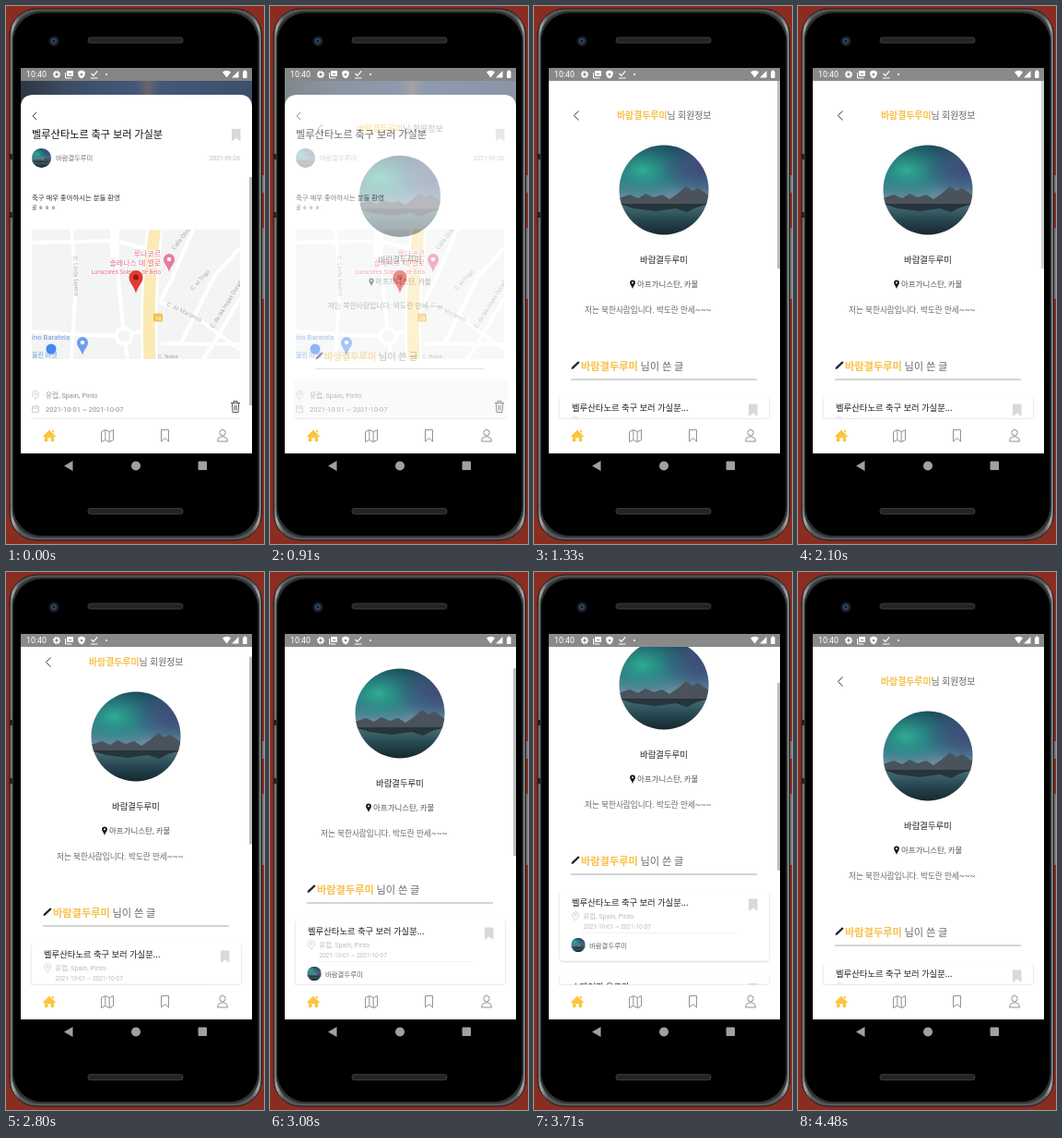
An HTML page for the animation above (4550 ms loop, 280 px wide and 582 px high).

```html
<!DOCTYPE html>
<html lang="ko">
<head>
<meta charset="utf-8">
<style>
html, body { margin: 0; width: 100%; height: 100%; overflow: hidden; background: #8a2d21; }
svg { display: block; width: 280px; height: 582px; font-family: Roboto, 'Noto Sans CJK KR', 'Noto Sans CJK', sans-serif; }
</style>
</head>
<body>
<svg id="stage" viewBox="0 0 280 582"></svg>
<script>
const LOOP = 4550, STEP = 70;
const USER = '바람결두루미', TRIP = '벨루산타노르 축구 보러 가실분';
const YELLOW = '#f7c04a';

const text = (x, y, size, str, fill, extra = '') =>
  `<text x="${x}" y="${y}" font-size="${size}" fill="${fill}" ${extra}>${str}</text>`;
const rect = (x, y, w, h, fill, extra = '') =>
  `<rect x="${x}" y="${y}" width="${w}" height="${h}" fill="${fill}" ${extra}/>`;
const circle = (x, y, r, fill, extra = '') =>
  `<circle cx="${x}" cy="${y}" r="${r}" fill="${fill}" ${extra}/>`;
const line = (d, stroke, width = 1, extra = '') =>
  `<path d="${d}" fill="none" stroke="${stroke}" stroke-width="${width}" ${extra}/>`;
const shape = (d, fill) => `<path d="${d}" fill="${fill}"/>`;
const avatar = (x, y, r) => `<use href="#lake" transform="translate(${x} ${y}) scale(${r / 48.5})"/>`;
const chevron = (x, y, size) => line(`M${x + size / 2} ${y - size}l${-size} ${size} ${size} ${size}`, '#444', 1);
const bookmark = (x, y) => shape(`M${x} ${y}h9.5v13.5l-4.75-3.6-4.75 3.6z`, '#d9d9d9');
const placeIcon = (x, y, color) =>
  line(`M${x} ${y + 4.5}c-2-2.5-3.5-4-3.5-5.8a3.5 3.5 0 0 1 7 0c0 1.8-1.5 3.3-3.5 5.8z`, color, .8) +
  circle(x, y - 1.3, 1.2, 'none', `stroke="${color}" stroke-width=".7"`);
const pin = (x, y, r, fill, dot) =>
  shape(`M${x} ${y + r * 2.3}C${x - r * .3} ${y + r * 1.2} ${x - r} ${y + r * .8} ${x - r} ${y}` +
    `a${r} ${r} 0 0 1 ${2 * r} 0C${x + r} ${y + r * .8} ${x + r * .3} ${y + r * 1.2} ${x} ${y + r * 2.3}z`, fill) +
  circle(x, y, r * .38, dot);

const defs = `<defs>
  <linearGradient id="aurora" x1="0" y1="0" x2="0" y2="1">
    <stop offset="0" stop-color="#1d4a5c"/><stop offset=".55" stop-color="#33748a"/>
    <stop offset="1" stop-color="#8098a8"/></linearGradient>
  <radialGradient id="glow" cx=".26" cy=".42" r=".5">
    <stop offset="0" stop-color="#2fae93"/><stop offset="1" stop-color="#1f7f78" stop-opacity="0"/></radialGradient>
  <radialGradient id="violet" cx=".95" cy=".4" r=".5">
    <stop offset="0" stop-color="#454a78"/><stop offset="1" stop-color="#454a78" stop-opacity="0"/></radialGradient>
  <linearGradient id="water" x1="0" y1="0" x2="0" y2="1">
    <stop offset="0" stop-color="#4b7079"/><stop offset=".5" stop-color="#274851"/><stop offset="1" stop-color="#15242c"/></linearGradient>
  <linearGradient id="sky"><stop offset="0" stop-color="#2d3743"/><stop offset=".2" stop-color="#3c4c63"/>
    <stop offset=".5" stop-color="#435878"/><stop offset=".55" stop-color="#6b646c"/>
    <stop offset=".6" stop-color="#435878"/><stop offset="1" stop-color="#3c4f6b"/></linearGradient>
  <linearGradient id="rim"><stop offset="0" stop-color="#55585a"/><stop offset=".012" stop-color="#a3a6a7"/>
    <stop offset=".04" stop-color="#55585a"/><stop offset=".96" stop-color="#55585a"/>
    <stop offset=".988" stop-color="#a3a6a7"/><stop offset="1" stop-color="#55585a"/></linearGradient>
  <clipPath id="round"><circle r="48.5"/></clipPath>
  <clipPath id="screen"><rect x="16" y="67" width="251" height="417"/></clipPath>
  <clipPath id="body"><rect x="16" y="81" width="251" height="403"/></clipPath>
  <clipPath id="mapArea"><rect x="28" y="242" width="226" height="140"/></clipPath>
  <filter id="shadow" x="-5%" y="-10%" width="110%" height="125%">
    <feDropShadow dx="0" dy="1" stdDeviation="1.1" flood-opacity=".2"/></filter>
  <g id="lake" clip-path="url(#round)">
    ${['aurora', 'glow', 'violet'].map(id => rect(-49, -49, 98, 66, `url(#${id})`)).join('')}
    ${rect(-49, 14, 98, 36, 'url(#water)')}
    ${shape('M-49 9l12-4 9 4 8-5 9 4 9-3 8 5 9-6 9-8 7 5 6-3 12 8v10h-98z', '#4a525c')}
    ${shape('M-49 15h98l-14 4-10 5-12-4-22 3-24-3z', '#26343b')}
  </g></defs>`;

function phone() {
  const grille = y => rect(89, y, 103, 6, '#242424', 'rx="2.5" stroke="#444" stroke-width=".8"');
  return rect(0, 0, 280, 582, '#8a2d21') +
    rect(275, 183, 5, 19, '#77797a', 'rx="1"') + rect(275, 240, 5, 77, '#77797a', 'rx="1"') +
    rect(4, 3, 273.5, 575, 'url(#rim)', 'rx="29" stroke="#1c1c1c" stroke-width="1"') +
    rect(6.5, 5.5, 268.5, 569.5, '#303233', 'rx="30"') +
    rect(8, 7.5, 265.5, 565.5, '#000', 'rx="31"') +
    rect(4, 160, 3, 6, '#222') + rect(4, 223, 3, 6, '#222') +
    circle(52, 38, 5.5, '#1a2028') + circle(52, 38, 3, '#31476b') + circle(52, 38, 1.3, '#0c1220') +
    grille(34) + grille(543.5) +
    shape('M63 497.5l9.5-5.5v11z', '#a0a0a0') + circle(141, 497.5, 5, '#a0a0a0') +
    rect(208.5, 492.5, 9.5, 9.5, '#a0a0a0', 'rx="1"');
}

function statusIcons() {
  return text(22, 77.3, 8.8, '10:40', '#fff') +
    circle(55, 74, 2.5, 'none', 'stroke="#fff" stroke-width="1.7"') +
    circle(55, 74, 3.8, 'none', 'stroke="#fff" stroke-width="1" stroke-dasharray="1.5 1.48"') +
    rect(66, 70, 7, 6, '#fff', 'rx="1"') + line('M64.5 72v6h7', '#fff') + line('M68 73.5h3', '#888') +
    shape('M82 69.5l3.8 1.5v3q-.5 3-3.8 4.5-3.3-1.5-3.8-4.5v-3z', '#fff') + circle(82, 74, 1.3, '#888') +
    line('M92.5 73l2.3 2.3 4.5-5M92 78h7.5', '#fff', 1.2) + circle(109, 74, 1, '#fff') +
    shape('M235 71.5q4.500-3.500 9 0l-4.500 6z', '#fff') + shape('M245 77.5h7.500v-7.500z', '#fff') +
    rect(257, 70.5, 4.5, 7.5, '#fff', 'rx=".7"') + rect(258.3, 69.5, 2, 1.5, '#fff');
}

function tabs() {
  const ink = '#868686';
  return shape('M16 484v-23q0-14 14-14h223q14 0 14 14v23z', '#fff') +
    line('M28 446.5h225', '#e6e6e6', .8) +
    shape('M40 465.5l7-7 7 7-1 1-1-.8v5.3h-3.300v-4h-3.400v4h-3.300v-5.300l-1 .8zM50 459h2v3l-2-2z', '#fcc63c') +
    line('M103.5 460.5l4.3-2 4.4 2 4.3-2v11l-4.3 2-4.4-2-4.3 2zM107.8 458.5v11M112.2 460.5v11', ink, .9) +
    line('M168.5 458.5h8v12.500l-4-3.500-4 3.500z', ink, .9) +
    circle(235, 461.5, 3.2, 'none', `stroke="${ink}" stroke-width=".9"`) +
    line('M229.5 471q0-4.500 3.500-5h4q3.500.5 3.500 5z', ink, .9);
}

function map() {
  const grey = '#a3a7ab', pink = '#dc6c8d', blue = '#6d9ce0';
  const street = (x, y, angle, name) =>
    text(x, y, 6.2, name, grey, `transform="rotate(${angle} ${x} ${y})"`);
  const roads = ['M28 352L90 356 128 357 152 350', 'M71 242L76 300 71 382', 'M118 242V256L128 357 132 382',
    'M28 256L118 254 152 262', 'M168 365L254 366', 'M166 320L206 336 254 372', 'M203 242L178 300 168 318',
    'M254 262L226 292 190 364', 'M254 316L226 364 214 382'];
  const highway = 'M161.5 242Q153 310 156 382';
  return `<g clip-path="url(#mapArea)">` + rect(28, 242, 226, 140, '#f3f4f4') +
    roads.map(d => line(d, '#fff', 4)).join('') +
    line('M118 242v30', '#fff', 10) +
    circle(128, 357, 8.5, '#f3f4f4', 'stroke="#fff" stroke-width="4"') +
    line(highway, '#fff', 18) + line(highway, '#fbeab5', 13) +
    street(73, 271, 88, 'C. Linda Serena') + street(183, 264, -52, 'Calle Olma') +
    street(203, 308, -48, 'C. el Trigo') + street(174, 324, 25, 'C. de Marlanco') +
    street(225, 349, -58, 'C. de las Hojas Doradas') + street(165, 381, 0, 'C. Nube') +
    rect(160, 332.5, 10, 9, '#f0c64e', 'rx="1.5"') + text(165, 339.5, 6, '18', '#fff', 'text-anchor="middle"') +
    `<g text-anchor="end" stroke="#fff" stroke-width="1.5" paint-order="stroke">` +
    text(168, 271, 8, '루나코르', pink) + text(168, 281, 8, '솔레나스 데 벨로', pink) +
    text(168, 290, 6.3, 'Lunacores Solenas de Belo', pink) + '</g>' +
    pin(177, 274, 6, '#e67ba0', '#fff') + pin(141, 293.5, 7.5, '#e33b30', '#8e1913') +
    text(28, 361, 7.8, 'ino Baratela', blue) + text(28, 380, 7, '올린 마켓', blue) +
    pin(83, 364, 6, '#6a9ff0', '#fff') + circle(49, 371, 5.5, '#4285f4') + '</g>';
}

function tripPage() {
  return rect(16, 67, 251, 417, '#fff') + rect(16, 67, 251, 50, 'url(#sky)') +
    rect(16, 67, 251, 14, '#838587') +
    shape('M16 484V110q0-14 14-14h223q14 0 14 14v374z', '#fff') + chevron(31, 119, 4) +
    text(28, 143, 11.2, TRIP, '#111', 'font-weight="500"') + bookmark(245, 133) +
    `<g id="author">${avatar(38.5, 164.5, 10.5)}${text(54, 167, 7.3, USER, '#777')}</g>` +
    text(221, 166.5, 6.5, '2021-09-26', '#bbb') +
    text(28, 210, 7.4, '축구 매우 좋아하시는 분들 환영', '#333') +
    text(28, 219.5, 5.9, '골 ㅎ ㅎ ㅎ', '#444') + map() +
    placeIcon(32, 421, '#c4c4c4') + text(43, 423.5, 7.5, '유럽, Spain, Pinto', '#8e8e8e') +
    line('M28.5 433h7v6.500h-7zM28.5 435h7M30.5 431.5v2M33.5 431.5v2', '#c4c4c4', .8) +
    text(43, 439, 7.5, '2021-10-01 ~ 2021-10-07', '#8e8e8e') +
    line('M244 429.5h10M247 429v-1.500h4v1.500M245.3 430l.7 9.500h6l.7-9.500M248 432v5.500M250 432v5.500', '#444', .9) +
    rect(264, 185, 3, 247, '#bebebe', 'id="tripBar"');
}

function card(y, title) {
  return `<g transform="translate(0 ${y})">` +
    rect(28, 0, 227, 76, '#fff', 'rx="4" filter="url(#shadow)"') +
    text(41, 16, 9.35, title + '...', '#222', 'font-weight="500"') + bookmark(233, 9) +
    placeIcon(45, 28, '#ccc') + text(53.5, 30, 7.3, '유럽, Spain, Pinto', '#bbb') +
    text(53.5, 41.5, 6.5, '2021-10-01 ~ 2021-10-07', '#bbb') +
    line('M53 46h167', '#eee', .8) + avatar(48, 59, 7.7) +
    text(60, 62, 7.4, USER, '#666') + '</g>';
}

function profilePage() {
  const user = `<tspan fill="${YELLOW}" font-weight="700">${USER}</tspan>`;
  return rect(16, 81, 251, 403, '#fff') + rect(16, 67, 251, 14, '#8a8a8a') +
    `<g clip-path="url(#body)"><g id="content">` + chevron(46, 118.5, 5) +
    text(90, 122, 9.9, user + '님 회원정보', '#666') + avatar(141, 199, 48.5) +
    text(141, 278, 9.4, USER, '#222', 'text-anchor="middle" font-weight="500"') +
    pin(107, 299.3, 2.9, '#111', '#fff') + text(112, 304, 8.5, '아프가니스탄, 카불', '#555') +
    text(55, 332, 8.65, '저는 북한사람입니다. 박도란 만세~~~', '#666') +
    shape('M40.5 393l.5-2.200 7-6.600 1.600 1.600-7 6.600z', '#222') +
    text(51, 394, 11.2, user + ' 님이 쓴 글', '#666') + line('M40 404h202', '#aaa', 1) +
    rect(14, 416.5, 255, 80, '#f4f4f4', 'id="empty"') +
    `<g id="posts">${card(421.5, TRIP)}${card(513, '스페인과 오로라')}</g></g>` +
    rect(264, 81, 3, 203, '#bebebe', 'id="profileBar"') + '</g>';
}

const stage = document.getElementById('stage');
stage.innerHTML = defs + phone() + `<g clip-path="url(#screen)">${tripPage()}` +
  `<g id="profile">${profilePage()}</g>${tabs()}</g>` + statusIcons();

const part = id => document.getElementById(id);
const set = (id, name, value) => part(id).setAttribute(name, value);

// Linear interpolation through [time, value] pairs.
function track(keys, t) {
  const i = keys.findIndex(key => key[0] > t);
  if (i === 0) return keys[0][1];
  if (i < 0) return keys[keys.length - 1][1];
  const [t0, a] = keys[i - 1], [t1, b] = keys[i];
  return a + (b - a) * (t - t0) / (t1 - t0);
}

const tripBarFade = [[280, 1], [420, 0]];
const pageFade = [[840, 0], [910, .4], [980, 1]];
const pageScale = [[910, .91], [980, .97], [1050, .99], [1120, 1]];
const barFade = [[1190, 0], [1260, 1], [2030, 1], [2240, 0], [2520, 0], [2590, 1], [4270, 1], [4480, 0]];
const scrolling = [[2520, 0], [2590, 2], [2660, 6], [2730, 13], [2800, 21], [2870, 30], [3010, 30],
  [3080, 46], [3150, 60], [3290, 60], [3360, 83], [3430, 90], [3500, 92], [3640, 92],
  [3710, 77], [3780, 55], [3920, 55], [3990, 18], [4060, 0]];

function draw(time) {
  const t = Math.floor((time % LOOP) / STEP + 1e-4) * STEP;
  const scroll = track(scrolling, t), scale = track(pageScale, t), loaded = t >= 1190;
  set('tripBar', 'opacity', track(tripBarFade, t));
  set('author', 'opacity', t >= 700 ? .5 : 1);
  set('profile', 'opacity', track(pageFade, t));
  set('content', 'transform', `translate(141 ${275 - scroll}) scale(${scale}) translate(-141 -275)`);
  set('posts', 'visibility', loaded ? 'visible' : 'hidden');
  set('empty', 'visibility', loaded ? 'hidden' : 'visible');
  set('profileBar', 'opacity', track(barFade, t));
  set('profileBar', 'y', 81 + scroll * .505);
}

const start = performance.now();
function tick() {
  draw(performance.now() - start);
  requestAnimationFrame(tick);
}
tick();
</script>
</body>
</html>
```
